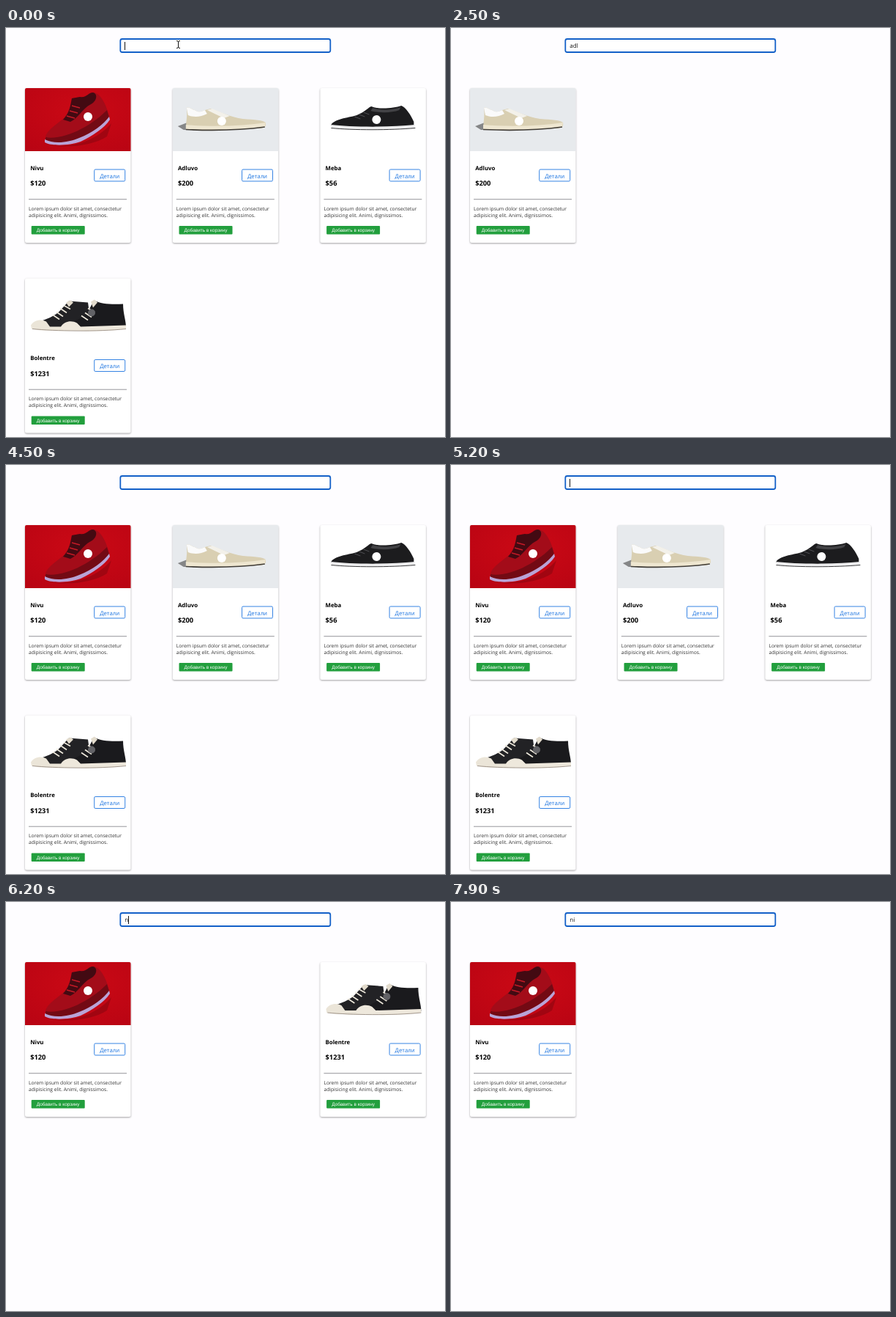
Write an HTML page that moves like this. It is 600 px wide and 558 px high and loops after 8000 ms.

```html
<!DOCTYPE html>
<html lang="ru">
<head>
<meta charset="utf-8">
<title>Каталог</title>
<style>
html, body { margin: 0; width: 100%; height: 100%; overflow: hidden; background: #fefdff; }
svg { display: block; }
text { font-family: "Open Sans", "Noto Sans", sans-serif; text-rendering: geometricPrecision; }
.card { filter: drop-shadow(0 1px 1.3px rgba(0, 0, 0, .36)); }
.name { font-size: 7.8px; font-weight: 700; }
.price { font-size: 9.25px; font-weight: 700; }
.details { font-size: 7.8px; fill: #1a73e0; text-anchor: middle; }
.about { font-size: 6.72px; fill: #333; }
.buy { font: 6.45px "Liberation Sans", Arial, sans-serif; fill: #fff; text-anchor: middle; }
.query { font-size: 8px; fill: #111; }
</style>
</head>
<body>
<svg id="stage" width="600" height="558" viewBox="0 0 600 558">
  <defs>
    <radialGradient id="redWall" cx=".55" cy=".35" r=".8">
      <stop offset="0" stop-color="#cb0915"/>
      <stop offset="1" stop-color="#b90413"/>
    </radialGradient>

    <g id="runner">
      <path d="M0 86V2q0-2 2-2H142.500q2 0 2 2V86Z" fill="url(#redWall)"/>
      <path d="M24 74C50 84 92 78 118 48L112 66C92 80 44 84 24 74Z" fill="#8d0510" opacity=".6"/>
      <path d="M28 66C30 58 42 50 52 42C60 34 62 24 64 14L75 12C84 14 86 6 93 6C104 6 112 26 115 38C112 50 92 62 76 68C60 76 36 76 28 72Z" fill="#a30c19"/>
      <path d="M64 14L75 12C84 14 86 6 93 6C100 8 98 18 90 22C78 28 74 40 62 46L52 43C61 34 62 24 64 14Z" fill="#430a12"/>
      <path d="M28 67C40 70 62 64 76 56C92 48 104 38 112 30L115 40C104 54 88 63 76 68C58 76 36 76 28 72Z" fill="#730a14"/>
      <path d="M27 70C40 77 60 74 74 68C92 61 108 49 115 39L116 43C108 55 92 65 76 73C60 79 34 79 27 74Z" fill="#b9a3d6"/>
      <path d="M57 38l11 3M61 31l11 3M64 24l11 3" stroke="#c51a27" stroke-width="1.500"/>
      <circle cx="86" cy="39" r="6" fill="#fff"/>
    </g>

    <g id="trainer">
      <path d="M0 86V2q0-2 2-2H142.500q2 0 2 2V86Z" fill="#e7eaed"/>
      <path d="M7 52L20 47L24 57H15Z" fill="#858687"/>
      <path d="M19 27C22 25 26 29 30 30C36 34 40 32 44 30L52 28C64 32 80 40 96 42C112 43 124 44 127 47C128 52 126 54 120 55L20 56C16 50 21 42 19 27Z" fill="#d9cfb2"/>
      <path d="M19 27C22 25 26 29 30 30C36 34 40 32 44 30L47 35C38 40 28 40 21 37Z" fill="#fafafa"/>
      <path d="M47 30L54 28L78 38L70 41Z" fill="#f3f1ea"/>
      <path d="M18 50C50 53 98 52 127 47L126 53C96 57 48 58 18 56Z" fill="#eee6d0"/>
      <path d="M18 56.500C52 58 96 57 126 53" fill="none" stroke="#403c36" stroke-width="1.700"/>
      <circle cx="67" cy="45" r="6" fill="#fff"/>
    </g>

    <g id="racer">
      <path d="M15 50C20 42 36 41 50 37C62 32 66 26 70 25C78 29 100 28 111 24C117 26 124 37 128 46V53H16Z" fill="#1c1c1e"/>
      <path d="M72 27C82 31 100 30 110 26L108 30C98 34 80 34 69 31Z" fill="#424245"/>
      <path d="M47 39l8 3M53 36l8 3M59 33l8 3" stroke="#505054"/>
      <path d="M15 50C40 53 92 54 129 50L130 54C96 57 44 57 16 54Z" fill="#eeeeef"/>
      <path d="M15 54.500C44 57.500 96 57.500 130 54.500" fill="none" stroke="#39393b"/>
      <circle cx="77" cy="43" r="6" fill="#fff"/>
    </g>

    <g id="hightop">
      <path d="M9 64C20 58 38 54 46 46L60 31L86 33L91 69H12Z" fill="#222225"/>
      <path d="M8 64C12 57 22 55 29 59L34 66L92 66V70C60 73 20 72 9 69Z" fill="#ebe5d8"/>
      <path d="M50 66C62 60 78 56 86 46L94 30C104 35 118 36 134 35C134 48 138 58 138 67H52Z" fill="#1a1a1d"/>
      <path d="M49 66C54 58 64 57 71 61L76 66L138 64V69C110 73 62 73 50 70Z" fill="#eee8dc"/>
      <path d="M56 33L62 30L66 33L60 39ZM90 32L95 29L99 33L93 40Z" fill="#e3dccd"/>
      <path d="M38 50l9 6M43 46l9 6M48 41l9 6M53 37l9 5M77 51l9 6M82 47l9 6M86 41l9 5" stroke="#eee9dc" stroke-width="1.600"/>
      <path d="M10 69C40 72 100 73 138 69" fill="none" stroke="#81746a" stroke-width=".7"/>
      <circle cx="91" cy="47" r="5" fill="#626266"/>
    </g>

    <g id="frame">
      <rect width="144.500" height="211" rx="2.500" fill="#fff"/>
    </g>
    <g id="details">
      <rect x="94.700" y="111" width="42" height="16" rx="1.500" fill="#fff" stroke="#3583e3"/>
      <text class="details" x="115.700" y="122.600">Детали</text>
      <path d="M5 151.700H139" stroke="#96959a"/>
      <text class="about" x="5" y="166.500">Lorem ipsum dolor sit amet, consectetur</text>
      <text class="about" x="5" y="175.700">adipisicing elit. Animi, dignissimos.</text>
      <rect x="8.700" y="188" width="73" height="11.600" rx="1" fill="#229f3d"/>
      <text class="buy" x="45.200" y="196.100">Добавить в корзину</text>
    </g>
  </defs>

  <rect width="600" height="558" fill="#fefdff"/>
  <rect x="156.300" y="15" width="287" height="18" rx="2.500" fill="#fff" stroke="#1360c8" stroke-width="1.800"/>
  <text id="query" class="query" x="162.300" y="27"></text>
  <rect id="caret" y="19" width="1" height="11" fill="#111"/>
  <g id="pointer" fill="none">
    <path d="M233 17.500q2.500 0 2.500 1.500q0-1.500 2.500-1.500M235.500 19V26M233 27.500q2.500 0 2.500-1.500q0 1.500 2.500 1.500" stroke="#fff" stroke-width="2"/>
    <path d="M233 17.500q2.500 0 2.500 1.500q0-1.500 2.500-1.500M235.500 19V26M233 27.500q2.500 0 2.500-1.500q0 1.500 2.500 1.500" stroke="#111"/>
  </g>
  <g id="cards"></g>
</svg>
<script>
const LOOP = 8000;
const COLS = [26, 227.8, 429.4];
const TOP = 82, ROW = 259.5;

const products = [
  { name: "Nivu", price: 120, shoe: "runner" },
  { name: "Adluvo", price: 200, shoe: "trainer" },
  { name: "Meba", price: 56, shoe: "racer" },
  { name: "Bolentre", price: 1231, shoe: "hightop" }
];

// time, typed text, caret shown
const steps = [
  [0, "", 1],
  [100, "a", 1], [600, "a", 0], [1100, "a", 1],
  [1600, "ad", 1],
  [2000, "adl", 1], [2500, "adl", 0],
  [2800, "adlu", 1], [2900, "adluv", 1], [3100, "adluvo", 1],
  [3600, "adluv", 0], [3800, "adlu", 0], [4000, "adl", 0], [4100, "ad", 1],
  [4300, "a", 0],
  [4500, "", 0], [5100, "", 1], [5600, "", 0], [6100, "", 1],
  [6200, "n", 1], [6600, "ni", 1],
  [7000, "niv", 1], [7200, "nivu", 1],
  [7600, "niv", 0], [7800, "ni", 0]
];

const byId = id => document.getElementById(id);
const query = byId("query"), caret = byId("caret"), pointer = byId("pointer");

byId("cards").innerHTML = products.map(p => `
  <g>
    <use href="#frame" class="card"/>
    <use href="#${p.shoe}"/>
    <text class="name" x="7.2" y="111.600">${p.name}</text>
    <text class="price" x="7.2" y="133.300">$${p.price}</text>
    <use href="#details"/>
  </g>`).join("");
const cards = [...byId("cards").children];

const show = (el, on) => el.setAttribute("visibility", on ? "visible" : "hidden");

function layout(text) {
  const found = cards.filter((c, i) => products[i].name.toLowerCase().includes(text));
  cards.forEach(c => show(c, found.includes(c)));
  found.forEach((c, i) => {
    // a pair sits at both ends of the row
    const col = found.length === 2 ? i * 2 : i % 3;
    const y = TOP + Math.floor(i / 3) * ROW;
    c.setAttribute("transform", `translate(${COLS[col]} ${y})`);
  });
}

let current = null;
function draw(time) {
  const t = time % LOOP;
  const step = steps.findLast(s => s[0] <= t);
  if (step !== current) {
    current = step;
    const [at, text, blink] = step;
    query.textContent = text;
    const width = text ? query.getComputedTextLength() : 0;
    caret.setAttribute("x", Math.floor(162.3 + width));
    show(caret, blink);
    show(pointer, at === 0);
    layout(text);
  }
}

const start = performance.now();
function tick() {
  draw(performance.now() - start);
  requestAnimationFrame(tick);
}
tick();
</script>
</body>
</html>
```
